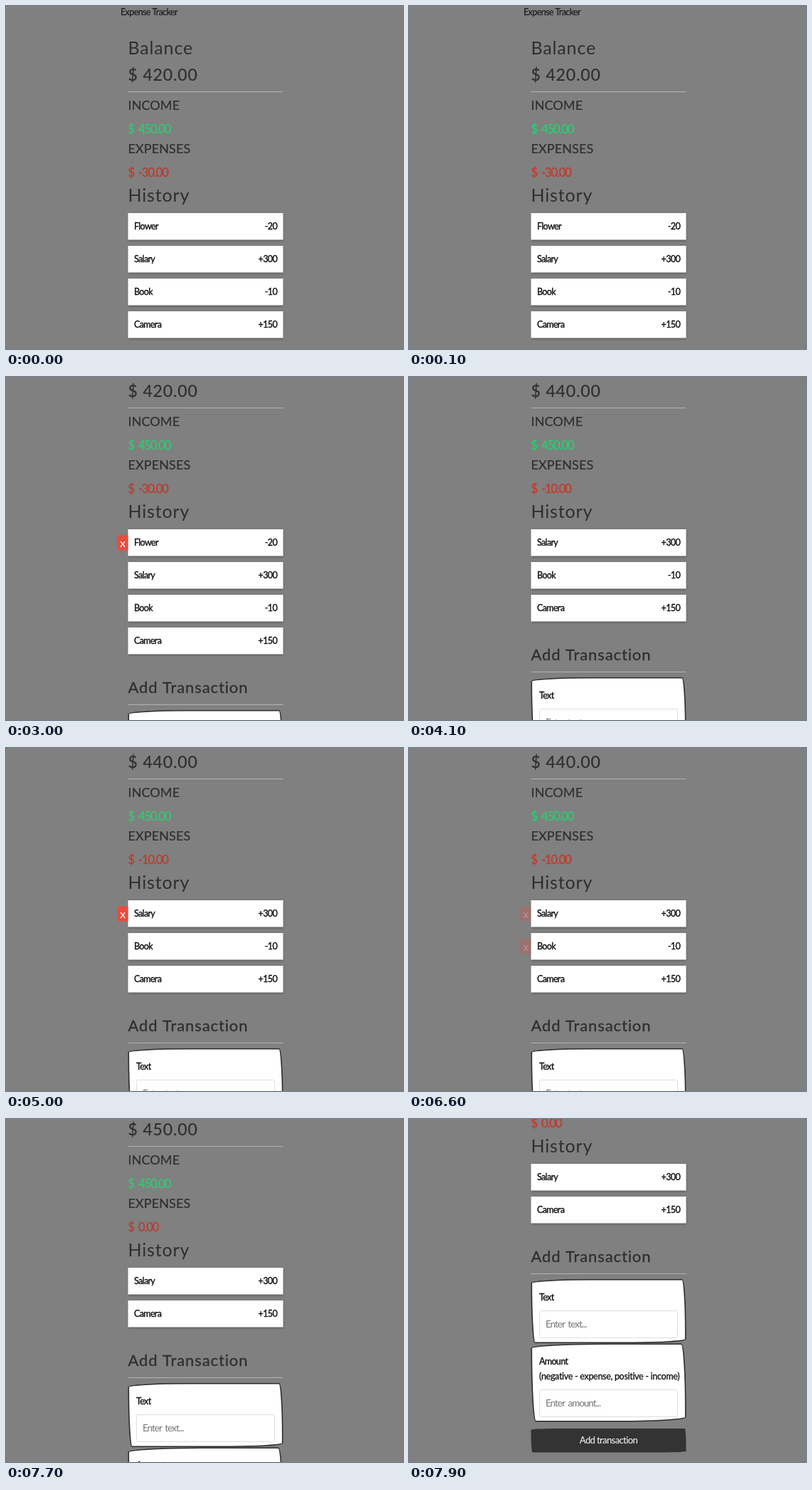
Animation, 558 px wide and 482 px high, one loop 8000 ms. Source, as an HTML page with a canvas:

```html
<!DOCTYPE html>
<html lang="en">
<head>
<meta charset="utf-8">
<title>Expense Tracker</title>
<style>
  html, body { margin: 0; width: 100%; height: 100%; overflow: hidden; background: #808080; }
  canvas { display: block; }
</style>
</head>
<body>
<canvas id="stage" width="558" height="482"></canvas>
<script>
const ctx = document.getElementById('stage').getContext('2d');
const LOOP = 8000, STEP = 100;
const LEFT = 171.5, WIDTH = 218, LIST_TOP = 291, PITCH = 46, ROW = 37.5;
const INK = '#2e2e2e', RULE = '#b4b4b4', GREEN = '#2ecc71', RED = '#c0392b';

const STYLES = {
  body:   { size: 12.5, gap: -0.65, edge: 0.35, color: '#111' },
  title:  { size: 12.5, gap: -0.6, edge: 0.2, color: '#1c1c1c' },
  note:   { size: 12.5, gap: -0.3, edge: 0.3, color: '#111' },
  hint:   { size: 13.5, gap: -1, word: 2, edge: 0, color: '#757575' },
  button: { size: 13, gap: -0.6, edge: 0, color: '#fff' },
  h1:     { size: 25, gap: 0.85, edge: 0, color: INK },
  h3:     { size: 22, gap: 0.9, edge: 0.3, color: INK },
  total:  { size: 23, gap: 0.85, edge: 0.2, color: INK },
  h4:     { size: 18, gap: 0.1, edge: 0.2, color: INK },
  money:  { size: 16.5, gap: -1.1, word: 3, edge: 0.3, color: INK },
  cross:  { size: 15.5, gap: 0, edge: 0, color: '#fff' }
};

const ITEMS = [['Flower', -20], ['Salary', 300], ['Book', -10], ['Camera', 150]];

// Scroll offset from each moment on
const SCROLL = [[0, 0], [2000, 28], [2100, 77], [7700, 82], [7800, 150], [7900, 228]];

function text(str, x, y, name, color, align = 'left') {
  const s = STYLES[name];
  ctx.font = `${s.size}px Lato, "Open Sans", sans-serif`;
  ctx.letterSpacing = s.gap + 'px';
  ctx.wordSpacing = (s.word || 0) + 'px';
  ctx.textAlign = align;
  ctx.fillStyle = ctx.strokeStyle = color || s.color;
  ctx.fillText(str, x, y);
  if (s.edge) {
    ctx.lineWidth = s.edge;
    ctx.strokeText(str, x, y);
  }
}

function rule(y) {
  ctx.fillStyle = RULE;
  ctx.fillRect(LEFT, y, WIDTH, 1);
}

// Hand-drawn outline: long shallow corners alternate with short steep ones
function wobbly(x, y, w, h) {
  const k = h / 270, a = 255 * k, b = 225 * k, c = 15 * k, q = Math.PI / 2;
  ctx.beginPath();
  ctx.ellipse(x + a, y + c, a, c, 0, 2 * q, 3 * q);
  ctx.ellipse(x + w - c, y + b, c, b, 0, 3 * q, 4 * q);
  ctx.ellipse(x + w - b, y + h - c, b, c, 0, 0, q);
  ctx.ellipse(x + c, y + h - a, c, a, 0, q, 2 * q);
  ctx.closePath();
}

function panel(y, h) {
  wobbly(LEFT + 0.8, y + 0.8, WIDTH - 1.6, h - 1.6);
  ctx.fillStyle = '#fff';
  ctx.fill();
  ctx.lineWidth = 1.6;
  ctx.strokeStyle = '#2c2c2c';
  ctx.stroke();
}

function field(hint, y) {
  ctx.beginPath();
  ctx.roundRect(183.5, y + 0.5, 194, 38, 2);
  ctx.lineWidth = 1;
  ctx.strokeStyle = '#dedede';
  ctx.stroke();
  text(hint, 192, y + 24.3, 'hint');
}

function row([label, amount], y) {
  ctx.save();
  ctx.shadowColor = 'rgba(0,0,0,0.3)';
  ctx.shadowBlur = 3;
  ctx.shadowOffsetY = 1;
  ctx.fillStyle = '#fff';
  ctx.fillRect(LEFT, y, WIDTH, ROW);
  ctx.restore();
  text(label, 180, y + 23, 'body');
  text((amount < 0 ? '-' : '+') + Math.abs(amount), 381, y + 23, 'body', null, 'right');
}

function removeButton(slot, alpha, top) {
  if (alpha <= 0) return;
  const y = top + slot * PITCH + 8.5;
  ctx.globalAlpha = alpha;
  ctx.fillStyle = '#e74c3c';
  ctx.fillRect(156.5, y, 15, 21);
  text('x', 164, y + 16.5, 'cross', null, 'center');
  ctx.globalAlpha = 1;
}

function fade(t, from, to) {
  const p = Math.min(1, Math.max(0, (t - from) / (to - from)));
  return p * p * (3 - 2 * p);
}

function buttonAlpha(t) {
  if (t < 4100) return [fade(t, 2600, 2800), 0];
  if (t < 7000) return [fade(t, 4100, 4400) - fade(t, 6400, 6700), fade(t, 6500, 6800)];
  return [0, fade(t, 7050, 7350) - fade(t, 7400, 7700)];
}

function itemsAt(t) {
  return ITEMS.filter(([label]) =>
    !(label === 'Flower' && t >= 4100) && !(label === 'Book' && t >= 7000));
}

function sum(items, test) {
  return items.reduce((total, [, n]) => total + (test(n) ? n : 0), 0);
}

const dollars = n => '$ ' + n.toFixed(2);

function drawSummary(items) {
  text('Expense Tracker', 161, 12.5, 'title');
  text('Balance', 171.5, 68, 'h1');
  text(dollars(sum(items, () => true)), 171.5, 104.5, 'total');
  rule(120);
  text('INCOME', 171.5, 145.5, 'h4');
  text(dollars(sum(items, n => n > 0)), 171.5, 178.5, 'money', GREEN);
  text('EXPENSES', 171.5, 206.5, 'h4');
  text(dollars(sum(items, n => n < 0)), 171.5, 239.5, 'money', RED);
  text('History', 171.5, 274.5, 'h1');
}

function drawForm(y) {
  text('Add Transaction', 171.5, y + 46, 'h3');
  rule(y + 62);

  panel(y + 70, 90);
  text('Text', 183, y + 100, 'body');
  field('Enter text...', y + 114);

  panel(y + 160.5, 110);
  text('Amount', 183, y + 190, 'body');
  text('(negative - expense, positive - income)', 183, y + 211, 'note');
  field('Enter amount...', y + 225);

  wobbly(LEFT, y + 280, WIDTH, 33.5);
  ctx.fillStyle = '#333';
  ctx.fill();
  text('Add transaction', 280.5, y + 301, 'button', null, 'center');
}

function draw(t) {
  const scroll = SCROLL.filter(([at]) => at <= t).pop()[1];
  const items = itemsAt(t);

  ctx.fillStyle = '#808080';
  ctx.fillRect(0, 0, 558, 482);
  ctx.save();
  ctx.translate(0, -scroll);
  drawSummary(items);
  items.forEach((item, i) => row(item, LIST_TOP + i * PITCH));
  buttonAlpha(t).forEach((alpha, slot) => removeButton(slot, alpha, LIST_TOP));
  drawForm(LIST_TOP + items.length * PITCH);
  ctx.restore();
}

const start = performance.now();
function tick() {
  const t = (performance.now() - start) % LOOP;
  draw(Math.floor(t / STEP) * STEP);
  requestAnimationFrame(tick);
}
tick();
</script>
</body>
</html>
```
